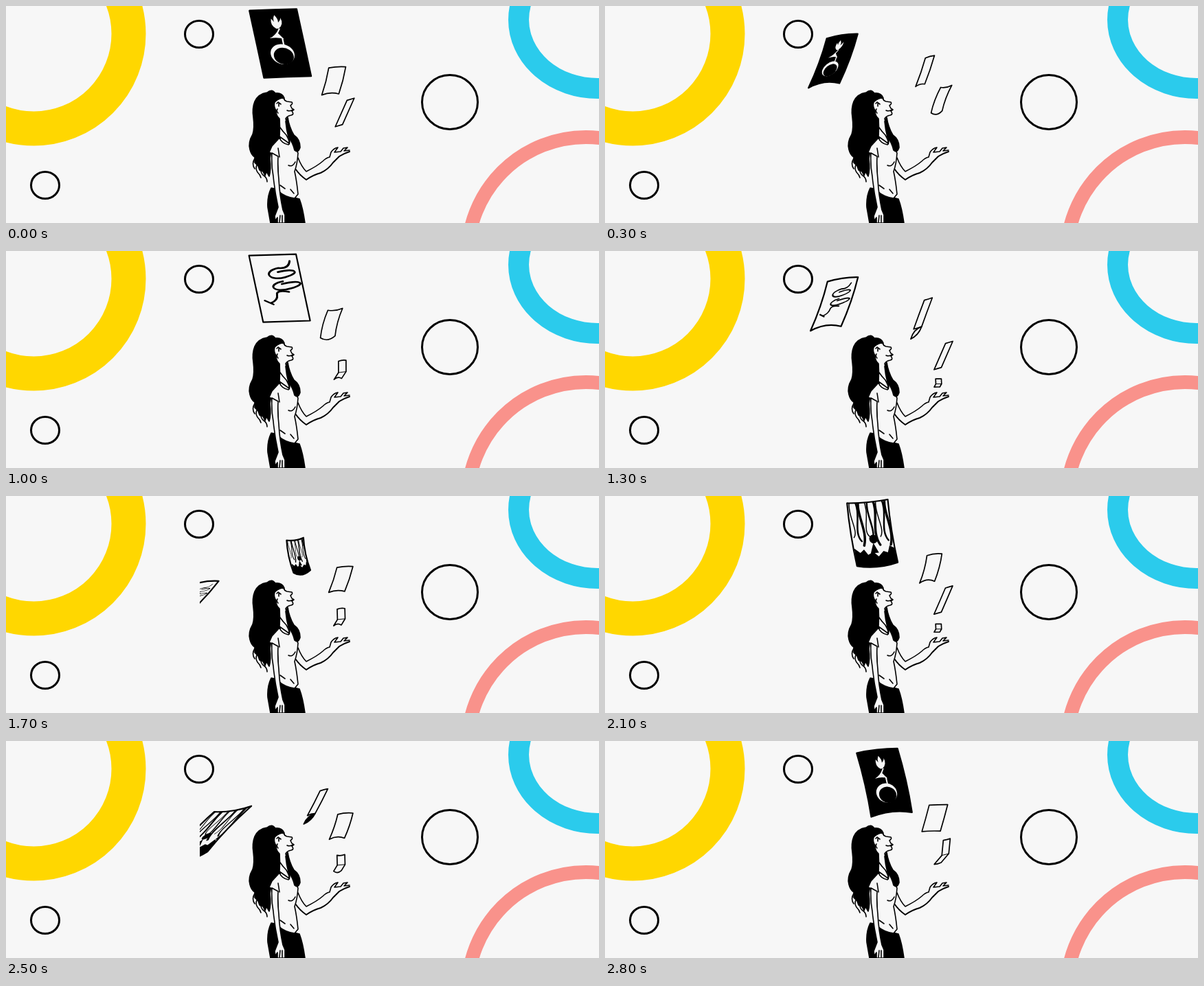
These frames come from a looping animation (863x316 px, 2.9 s). An HTML page with a canvas:

```html
<!DOCTYPE html>
<html lang="en">
<head>
<meta charset="utf-8">
<title>Juggling cards</title>
<style>
  html, body { margin: 0; width: 100%; height: 100%; overflow: hidden; background: #f7f7f7; }
  svg, canvas { position: absolute; left: 0; top: 0; display: block; }
</style>
</head>
<body>
<svg width="863" height="316" viewBox="0 0 863 316" fill="none">
  <circle cx="40.5" cy="40.5" r="138" stroke="#ffd700" stroke-width="50"/>
  <ellipse cx="861" cy="20" rx="115" ry="100" stroke="#2bcbec" stroke-width="30"/>
  <circle cx="844" cy="363" r="172" stroke="#f9928b" stroke-width="20"/>
  <g stroke="#000" stroke-width="3">
    <ellipse cx="281" cy="41" rx="20.5" ry="19.5"/>
    <ellipse cx="57" cy="261" rx="20.5" ry="19.5"/>
    <ellipse cx="646" cy="140" rx="40.5" ry="39.5"/>
  </g>
  <g stroke="#000" stroke-width="1.6" stroke-linecap="round" stroke-linejoin="round">
    <!-- hair -->
    <path fill="#000" d="M405 134Q402 126 392 127Q387 120 380 126Q367 128 362 139Q358 149 360 162Q362 178 359 187Q352 199 355 209Q357 217 362 220L362 228L367 233L369 239L374 241L377 247L379 241L383 248Q386 238 384 222L387 205L400 192L400 160Z"/>
    <path d="M362 222Q357 230 362 237M366 230Q362 236 366 242Q370 246 371 250M371 236Q370 243 375 247Q380 250 380 256"/>
    <!-- face and neck -->
    <path fill="#f7f7f7" d="M404 134Q405 138 409 139L416 140Q418 142 414 145L416 149L419 151L416 153Q420 158 415 159Q409 160 407 164Q409 173 412 180L412 200L398 190Q399 176 398 164Q393 160 393 152Q389 146 391 140Q397 134 404 134Z"/>
    <path d="M394 142L396 140L400 143M397 142V146M409 152Q413 154 418 151M395 150Q393 153 396 156"/>
    <!-- far arm -->
    <path fill="#f7f7f7" stroke="none" d="M424 221L437 241L470 221L478 228L437 253L420 238Z"/>
    <path d="M425 221Q430 234 437 241Q453 233 461 226Q466 221 471 220L473 213Q477 207 483 206L478 213L487 212L491 207L497 206L492 211L500 210"/>
    <path stroke-width="2" d="M421 237Q428 247 437 253Q447 246 458 243Q469 238 476 228L485 219Q491 215 500 212"/>
    <!-- trousers -->
    <path fill="#000" d="M386 265Q380 277 381 293L385 316H435Q432 294 427 281L419 279L397 267Z"/>
    <!-- shirt and front lock -->
    <path fill="#f7f7f7" d="M398 192L387 204L383 213L395 219Q396 246 397 270Q406 278 420 280L425 274Q423 254 420 241Q424 230 425 214Q421 208 417 198L412 192Q414 200 411 202Q401 200 398 192Z"/>
    <path d="M396 207L398 220M411 232Q417 235 421 227M399 261L406 266M414 267L419 273M399 177Q403 183 408 188Q414 199 412 201"/>
    <path fill="#000" d="M410 162Q412 176 419 188Q428 194 428 206Q425 215 420 210Q417 198 411 191Q408 180 407 168Z"/>
    <!-- near arm -->
    <path fill="#f7f7f7" d="M387 214Q386 232 389 248Q391 270 396 293L391 306L392 313L395 308L395 316H406L406 304L403 297Q398 274 397 252Q395 236 396 219Z"/>
    <path d="M399 305L398 315M402 305L402 315"/>
  </g>
</svg>
<canvas id="stage" width="863" height="316"></canvas>
<script>
const ctx = document.getElementById('stage').getContext('2d');
const LOOP = 2900, STEP = 100, PAPER = '#f7f7f7', INK = '#000';

// Faces are drawn in a 60 x 100 box that is laid onto the card.
const flame = new Path2D('M30 8Q34 14 33 19Q37 15 37 12Q40 22 32 28H29Q22 23 25 13Q27 16 28 18Q27 13 30 8ZM34 28L30 35L36 44Q29 40 18 42Q27 38 32 28ZM33 42H35V54H33Z');
const squiggle = new Path2D('M50 10Q47 22 34 20C12 24 18 40 40 34S56 20 32 26M36 40C14 44 20 58 44 51S58 38 34 44M41 56Q25 52 25 60T15 72M8 68L18 74');
const ground = new Path2D('M0 72L8 80L14 75L19 84L27 80L34 88L42 80L48 83L52 72L60 78V125H0Z');

function crescent() {
  ctx.fillStyle = PAPER;
  ctx.fill(flame);
  ctx.beginPath();
  ctx.arc(30, 66, 15, 0, 7);
  ctx.fill();
  ctx.fillStyle = INK;
  ctx.beginPath();
  ctx.arc(31, 69, 12.5, 0, 7);
  ctx.fill();
}

function scribble() {
  ctx.lineWidth = 2.6;
  ctx.stroke(squiggle);
}

function forest() {
  ctx.fillStyle = INK;
  ctx.fill(ground);
  for (let i = 0; i < 9; i++) {
    const x = 4 + i * 6.5, sway = i % 2 ? 9 : -7;
    ctx.lineWidth = 1.5 + i % 3;
    ctx.beginPath();
    ctx.moveTo(x, -5);
    ctx.bezierCurveTo(x + sway, 20, x - sway, 45, x + sway / 4, 55 + i * 7 % 20);
    ctx.stroke();
  }
  ctx.beginPath();
  ctx.ellipse(30, 60, 6, 7, 0, 0, 7);
  ctx.moveTo(29, 66);
  ctx.lineTo(35, 82);
  ctx.lineTo(23, 82);
  ctx.fill();
}

const cards = [
  { face: crescent, back: INK, born: 500, life: 3050, arch: -0.17 },
  { face: scribble, back: PAPER, born: 1200, life: 3400, arch: -0.17 },
  { face: forest, back: PAPER, born: 2000, life: 3600, arch: 0.2 }
];

// The flight all cards share: progress, centre x and y, height, lean in degrees.
const flight = [
  [0, 484, 196, 9, 10],
  [0.15, 485, 176, 25, 12],
  [0.25, 493, 155, 42, 24],
  [0.4, 487, 120, 38, 18],
  [0.51, 476, 108, 41, 14],
  [0.64, 459, 86, 46, 22],
  [0.68, 445, 94, 32, 35],
  [0.72, 427, 88, 45, -12],
  [0.76, 403, 56, 104, -13],
  [0.83, 393, 52, 94, -11],
  [0.88, 335, 75, 75, 18],
  [0.94, 300, 131, 95, 44],
  [1, 275, 146, 55, 42]
];

function flightAt(p) {
  const i = Math.max(1, flight.findIndex(key => key[0] >= p));
  const from = flight[i - 1], to = flight[i];
  const k = (p - from[0]) / (to[0] - from[0]);
  return from.map((v, j) => v + (to[j] - v) * k);
}

function drawCard({ face, back, born, life, arch }, time) {
  const p = (time - born) / life;
  if (p < 0 || p > 1) return;
  const [, x, y, height, lean] = flightAt(p);

  // The card flutters faster as it rises: width, slope and bend follow.
  const flutter = Math.cos(16.5 * Math.min(p, 0.85) ** 1.2);
  const width = height * (0.47 + 0.22 * flutter);
  const slope = (0.27 * flutter - 0.3) * Math.min(1, height / 80);
  const bend = arch * height * (1 - flutter ** 2);
  const folded = p < 0.24, curled = p > 0.6 && p < 0.66, turned = p >= 0.66;
  const bow = folded ? height * 0.12 : -bend * 0.4;

  const angle = lean * Math.PI / 180;
  const downX = -height * Math.sin(angle), downY = height * Math.cos(angle);
  const point = (u, v) => [x + width * u + downX * v, y + width * slope * u + downY * v];
  const [tl, tr, br, bl] = [point(-0.5, -0.5), point(0.5, -0.5), point(0.5, 0.5), point(-0.5, 0.5)];
  const middle = (a, b, dx, dy) => [(a[0] + b[0]) / 2 + dx, (a[1] + b[1]) / 2 + dy];
  const right = middle(tr, br, bow, folded ? bow : 0), left = middle(bl, tl, bow, folded ? bow : 0);

  const outline = new Path2D();
  const side = (mid, end) => {
    if (folded) {
      outline.lineTo(...mid);
      outline.lineTo(...end);
    } else outline.quadraticCurveTo(...mid, ...end);
  };
  outline.moveTo(...tl);
  outline.quadraticCurveTo(...middle(tl, tr, 0, bend * 0.4), ...tr);
  side(right, br);
  outline.quadraticCurveTo(...middle(br, bl, 0, bend), ...bl);
  side(left, tl);
  outline.closePath();

  ctx.fillStyle = turned ? back : PAPER;
  ctx.strokeStyle = INK;
  ctx.lineWidth = turned ? 2.2 : 1.7;
  ctx.fill(outline);
  if (turned) {
    ctx.save();
    ctx.clip(outline);
    ctx.transform(width / 60, width * slope / 60, downX / 100, downY / 100, ...tl);
    face();
    ctx.restore();
  }
  ctx.stroke(outline);

  if (folded) {
    ctx.lineWidth = 1;
    ctx.beginPath();
    ctx.moveTo(...left);
    ctx.lineTo(...right);
    ctx.stroke();
  }
  if (curled) {
    const tip = point(-0.4, 0.85);
    ctx.fillStyle = back;
    ctx.beginPath();
    ctx.moveTo(...br);
    ctx.quadraticCurveTo(...bl, ...tip);
    ctx.quadraticCurveTo(...point(0.5, 0.8), ...br);
    ctx.fill();
    ctx.stroke();
  }
}

function draw() {
  const time = Math.floor((performance.now() - start) % LOOP / STEP) * STEP;
  ctx.clearRect(0, 0, 863, 316);
  for (const card of cards) {
    drawCard(card, time);
    drawCard(card, time + LOOP);
  }
  requestAnimationFrame(draw);
}

ctx.rect(282, 2, 300, 314);
ctx.clip();
ctx.lineJoin = ctx.lineCap = 'round';
const start = performance.now();
draw();
</script>
</body>
</html>
```
